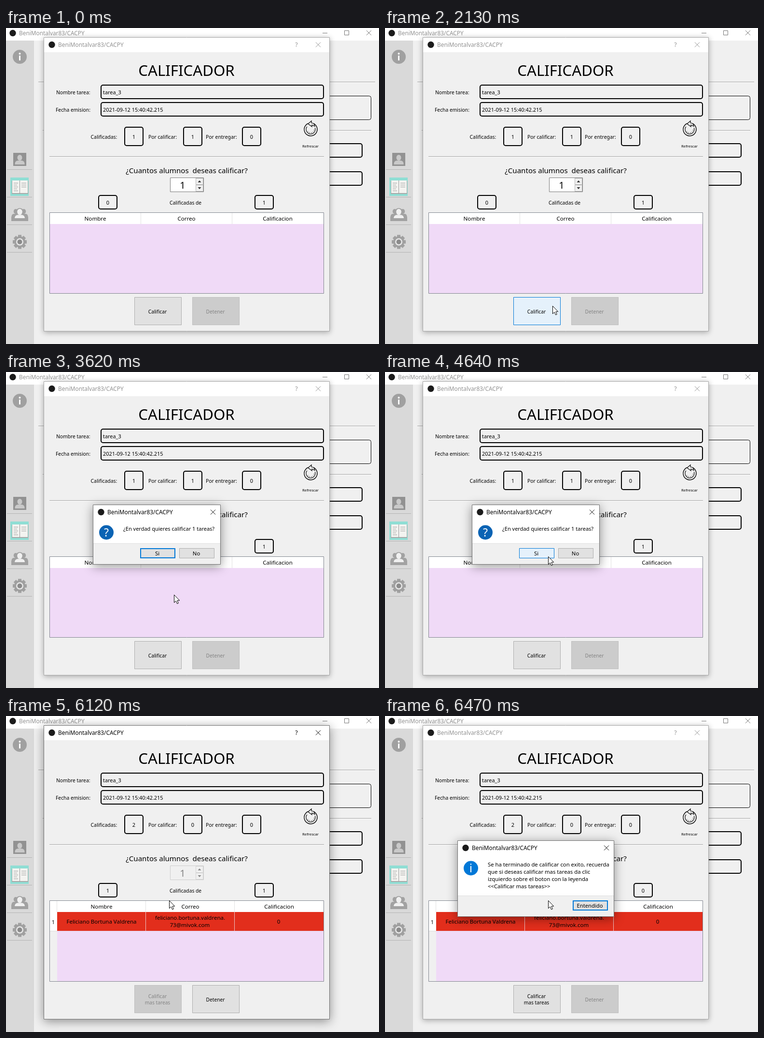
An HTML page with a canvas for the animation above (8000 ms loop, 773 px wide and 653 px high).

```html
<!DOCTYPE html>
<html lang="es">
<head>
<meta charset="utf-8">
<title>Calificador</title>
<style>
html, body { margin: 0; width: 100%; height: 100%; overflow: hidden; background: #f0f0f0; }
canvas { display: block; }
</style>
</head>
<body>
<canvas id="stage" width="773" height="653"></canvas>
<script>
const W = 773, H = 653, LOOP = 8000;
const stage = document.getElementById('stage').getContext('2d');
const layer = document.createElement('canvas');
layer.width = W;
layer.height = H;
const layerCtx = layer.getContext('2d');
let c = stage;

const APP = 'BeniMontalvar83/CACPY';
const FONT = '"Noto Sans", "Open Sans", sans-serif';
const GREY = '#838383';
const NORMAL = { fill: [225, 225, 225], edge: [173, 173, 173] };
const HOVER = { fill: [229, 241, 251], edge: [0, 120, 215] };
const PRESSED = { fill: [204, 228, 247], edge: [0, 84, 153] };
const OFF = { fill: [204, 204, 204], edge: [191, 191, 191] };

const clamp = v => Math.max(0, Math.min(1, v));
const lerp = (a, b, p) => a + (b - a) * p;
const ease = p => p * p * (3 - 2 * p);
const rgb = a => `rgb(${a.map(Math.round)})`;
const mix = (a, b, p) => ({
  fill: a.fill.map((v, i) => lerp(v, b.fill[i], p)),
  edge: a.edge.map((v, i) => lerp(v, b.edge[i], p))
});

// Progress 0..1 that advances in equal held steps
function stepped(t, start, end, n) {
  if (t < start) return 0;
  return clamp((Math.floor((t - start) / (end - start) * (n - 1) + 1e-6) + 1) / n);
}

function text(s, x, y, size = 10.3, color = '#000', align = 'left') {
  c.font = `${size}px ${FONT}`;
  c.fillStyle = color;
  c.textAlign = align;
  c.fillText(s, x, y);
}
const mid = (s, x, y, size, color) => text(s, x, y, size, color, 'center');

function rect(x, y, w, h, color) {
  c.fillStyle = color;
  c.fillRect(x, y, w, h);
}

function frame(x, y, w, h, color, lw = 1, r = 0) {
  c.strokeStyle = color;
  c.lineWidth = lw;
  c.beginPath();
  c.roundRect(x + lw / 2, y + lw / 2, w - lw, h - lw, r);
  c.stroke();
}

function path(points, color, lw = 1, close = false) {
  c.beginPath();
  points.forEach(([x, y]) => c.lineTo(x, y));
  if (close) c.closePath();
  c.strokeStyle = color;
  c.lineWidth = lw;
  c.stroke();
}

function poly(points, color) {
  c.beginPath();
  points.forEach(([x, y]) => c.lineTo(x, y));
  c.fillStyle = color;
  c.fill();
}

function disc(x, y, r, color) {
  c.beginPath();
  c.arc(x, y, r, 0, Math.PI * 2);
  c.fillStyle = color;
  c.fill();
}

function ring(x, y, r, color, lw, from = 0, to = Math.PI * 2) {
  c.beginPath();
  c.arc(x, y, r, from, to);
  c.strokeStyle = color;
  c.lineWidth = lw;
  c.stroke();
}

function cross(x, y, color) {
  path([[x - 5, y - 5], [x + 5, y + 5]], color);
  path([[x + 5, y - 5], [x - 5, y + 5]], color);
}

function groove(x, y, w) {
  rect(x, y, w, 1, '#a0a0a0');
  rect(x, y + 1, w, 1, '#fff');
}

function win(x, y, w, h, bar, active) {
  c.save();
  c.shadowColor = active ? 'rgba(0,0,0,.42)' : 'rgba(0,0,0,.32)';
  c.shadowBlur = active ? 20 : 11;
  c.shadowOffsetY = active ? 4 : 2;
  rect(x, y, w, h, '#f0f0f0');
  c.restore();
  rect(x, y, w, bar, '#fff');
  frame(x, y, w, h, active ? '#707070' : '#a6a6a6');
}

function titleBar(x, y, closeX, color) {
  disc(x, y, 6.7, '#1b1b1b');
  text(APP, x + 13, y + 4.5, 11.85, color);
  if (closeX) cross(closeX, y, color);
}

function button(x, y, w, h, look, lines, size, color, lw = 1) {
  rect(x, y, w, h, rgb(look.fill));
  frame(x, y, w, h, rgb(look.edge), lw);
  const first = y + h / 2 + 4.5 - (lines.length - 1) * 6.5;
  lines.forEach((s, i) => mid(s, x + w / 2 - 1, first + i * 13, size, color));
}

function counter(x, y, h, value) {
  frame(x, y, 40, h, '#000', 2, 4);
  mid(value, x + 20, y + h / 2 + 5, 11);
}

function person(x, y, s, color) {
  c.beginPath();
  c.ellipse(x, y, 5 * s, 6 * s, 0, 0, Math.PI * 2);
  c.fillStyle = color;
  c.fill();
  c.beginPath();
  c.roundRect(x - 10 * s, y + 6 * s, 20 * s, 8 * s, [6 * s, 6 * s, 0, 0]);
  c.fill();
}

function sidebar() {
  rect(0, 26, 58, H - 26, '#d9d9d9');
  disc(28.5, 59.5, 14.5, '#a0a0a0');
  disc(28.5, 53, 2, '#fff');
  rect(27, 57, 3, 10, '#fff');

  rect(15, 258, 27, 27, '#929292');
  person(28.5, 268, 1, '#c9c9c9');
  rect(23, 275, 11, 4, '#c9c9c9');

  rect(9, 309, 38, 38, '#8fded4');
  rect(12, 316, 34, 27, '#a9a9a9');
  rect(13, 315, 32, 26, '#f3f3f0');
  rect(28, 315, 1, 27, '#999');
  for (let i = 0; i < 5; i++) {
    rect(16, 320 + i * 4, i % 2 ? 7 : 9, 1, '#a0a0a0');
    if (i < 3) rect(32, 320 + i * 4, 10, 1, '#a0a0a0');
  }

  person(20, 379, .85, '#a2a2a2');
  person(37, 379, .85, '#a2a2a2');
  rect(11, 390, 35, 9, '#a2a2a2');
  disc(28.5, 381, 9, '#a2a2a2');
  person(28.5, 380, 1.05, '#f0f0f0');
  rect(18, 393, 21, 3, '#a2a2a2');

  c.save();
  c.translate(28.5, 442);
  for (let i = 0; i < 8; i++) {
    c.rotate(Math.PI / 4);
    rect(-3.5, -14.5, 7, 8, '#a0a0a0');
  }
  c.restore();
  disc(28.5, 442, 11.5, '#a0a0a0');
  disc(28.5, 442, 7.5, '#e8e8e8');
  disc(28.5, 442, 5, '#8b8b8b');

  [292, 349, 406, 463].forEach(y => rect(2, y, 52, 1, '#b4b4b4'));
}

function backWindow() {
  rect(0, 0, W, H, '#f0f0f0');
  rect(0, 0, W, 26, '#fff');
  titleBar(14, 10.5, 0, '#929292');
  rect(656, 10, 10, 1, '#777');
  frame(701, 5, 10, 10, '#777');
  cross(752, 10, '#777');
  sidebar();
  groove(67, 111, 698);
  groove(76, 211, 681);
  frame(100, 140, 657, 50, '#000', 1, 4);
  frame(100, 238, 639, 30, '#000', 2, 4);
  frame(100, 296, 639, 30, '#000', 2, 4);
}

function refreshIcon() {
  ring(631.5, 209.5, 13.5, '#111', 1.5, -1.1, Math.PI * 1.36);
  ring(631.5, 209.5, 9.5, '#111', 1.2, -.35, Math.PI * 1.2);
  c.setLineDash([1.5, 2.5]);
  ring(631.5, 209.5, 7, '#111', 1, .1, 2.6);
  c.setLineDash([]);
  const arrow = [[633, 192], [626, 198], [634, 204], [634, 200.5], [640, 203], [638, 197.5], [633, 196]];
  poly(arrow, '#f0f0f0');
  path(arrow, '#111', 1.3, true);
  mid('Refrescar', 631, 247, 7.7);
}

function spinBox(value, on) {
  rect(340, 309, 70, 30, on ? '#fff' : '#f0f0f0');
  frame(340, 309, 70, 30, on ? '#7a7a7a' : '#ccc');
  [[310, 1], [324, -1]].forEach(([y, up]) => {
    rect(393, y, 16, 14, '#f0f0f0');
    frame(393, y, 16, 14, on ? '#b4b4b4' : '#d2d2d2');
    const m = y + 7;
    poly([[397.5, m + 2 * up], [404.5, m + 2 * up], [401, m - 2 * up]], on ? '#333' : '#888');
  });
  mid(value, 366, 332, 20, on ? '#000' : GREY);
}

function table(hasRow) {
  rect(90, 381, 569, 168, '#f0daf7');
  rect(91, 382, 567, 23, '#fff');
  const cuts = hasRow ? [289, 473] : [279, 468];
  const centers = hasRow ? [198, 382, 566] : [185, 374, 563];
  cuts.forEach(x => rect(x, 382, 1, 23, '#e2e2e2'));
  ['Nombre', 'Correo', 'Calificacion'].forEach((s, i) => mid(s, centers[i], 398, 11.6));
  if (hasRow) {
    rect(91, 405, 15, 143, '#f0f0f0');
    rect(91, 405, 15, 39, '#fff');
    rect(105, 382, 1, 23, '#e2e2e2');
    rect(91, 444, 15, 1, '#dcdcdc');
    rect(106, 405, 552, 39, '#e22e1c');
    rect(106, 444, 552, 1, '#e4d3ea');
    cuts.forEach(x => rect(x, 405, 1, 39, '#ecc4c6'));
    mid('1', 98, 430, 11);
    mid('Feliciano Bortuna Valdrena', 198, 429, 11.5);
    mid('feliciano.bortuna.valdrena.', 381.5, 421, 11.5);
    mid('73@mivok.com', 381, 436, 11.5);
    mid('0', 565, 429, 11.5);
  }
  frame(90, 381, 569, 168, '#828790');
}

function gradeLook(t) {
  if (t < 2460) return mix(NORMAL, HOVER, stepped(t, 1700, 1860, 3));
  return mix(PRESSED, NORMAL, stepped(t, 2590, 2730, 3));
}

function mainDialog(t) {
  const active = (t >= 2460 && t < 2660) || (t >= 5170 && t < 6260);
  const running = t >= 5170 && t < 6190;
  const graded = t >= 6120, done = t >= 6190;
  const tint = active ? '#000' : '#929292';

  win(78, 19, 593, 608, 31, active);
  titleBar(95, 34.5, 647, tint);
  mid('?', 602, 39, 12.5, tint);

  mid('CALIFICADOR', 374, 99, 31.2);
  text('Nombre tarea:', 104, 137);
  text('Fecha emision:', 103, 173);
  frame(196, 117, 463, 30, '#000', 2, 4);
  frame(196, 153, 463, 30, '#000', 2, 4);
  text('tarea_3', 201, 137, 10.9);
  text('2021-09-12 15:40:42.215', 201, 173, 10.9);

  text('Calificadas:', 175.5, 229, 10.4);
  text('Por calificar:', 295, 229, 10.3);
  text('Por entregar:', 414, 229, 10.4);
  counter(245, 204, 40, graded ? '2' : '1');
  counter(367, 204, 40, graded ? '0' : '1');
  counter(489, 204, 40, '0');
  refreshIcon();
  groove(90, 265, 569);

  mid('¿Cuantos alumnos  deseas calificar?', 374.5, 300, 15.1);
  spinBox(done ? '0' : '1', !running);
  counter(191, 345, 30, graded && !done ? '1' : '0');
  text('Calificadas de', 339, 365, 10.25);
  counter(515, 345, 30, done ? '0' : '1');
  table(graded);

  const label = t >= 5170 ? ['Calificar', 'mas tareas'] : ['Calificar'];
  button(266, 556, 98, 58, running ? OFF : gradeLook(t), label, 10.2, running ? GREY : '#000');
  button(386, 556, 98, 58, running ? NORMAL : OFF, ['Detener'], 10.2, running ? '#000' : GREY);
}

function messageBox(x, y, w, h, footer, icon, color) {
  win(x, y, w, h, footer, true);
  rect(x + 1, y + footer, w - 2, 1, '#dfdfdf');
  titleBar(x + 17, y + 15.5, x + w - 16, '#000');
  disc(x + 28, y + 57.5, 15, color);
  mid(icon, x + 28, y + 66, 23, '#fff');
}

function askBox(t) {
  messageBox(180, 274, 265, 124, 80, '?', '#0a63b4');
  text('¿En verdad quieres calificar 1 tareas?', 243, 328, 11);
  const over = stepped(t, 4170, 4380, 4);
  const press = stepped(t, 4700, 4770, 2) - stepped(t, 4900, 4970, 2);
  const idle = { fill: NORMAL.fill, edge: HOVER.edge };
  const look = mix(mix(idle, HOVER, over), PRESSED, press);
  button(278, 364, 73, 21, look, ['Si'], 11.3, '#000', over > .5 ? 1 : 2);
  button(359, 364, 73, 21, NORMAL, ['No'], 11.3, '#000');
}

function doneBox() {
  messageBox(150, 257, 325, 158, 114, 'i', '#0078d7');
  ['Se ha terminado de calificar con exito, recuerda',
    'que si deseas calificar mas tareas da clic',
    'izquierdo sobre el boton con la leyenda',
    '<<Calificar mas tareas>>'
  ].forEach((s, i) => text(s, 213, 311 + i * 15, 11.3));
  button(389, 381, 73, 21, { fill: NORMAL.fill, edge: HOVER.edge }, ['Entendido'], 11.2, '#000', 2);
}

// Paints a box on its own layer, then blends it with scale about its centre
function fade(paint, cx, cy, alpha, scale) {
  if (alpha <= 0) return;
  layerCtx.clearRect(0, 0, W, H);
  c = layerCtx;
  paint();
  c = stage;
  c.save();
  c.globalAlpha = alpha;
  c.translate(cx, cy);
  c.scale(scale, scale);
  c.drawImage(layer, -cx, -cy);
  c.restore();
}

function popup(t) {
  if (t >= 2660 && t < 5230) {
    const open = stepped(t, 2660, 2870, 4);
    const shut = t < 5120 ? 0 : t < 5170 ? .45 : .85;
    const alpha = (1 - Math.pow(1 - open, 2.75)) * (1 - shut);
    fade(() => askBox(t), 312.5, 336, alpha, 1 - .03 * (1 - open) ** 2 - .06 * shut);
  } else if (t >= 6260) {
    const open = stepped(t, 6260, 6470, 4);
    fade(doneBox, 312.5, 336, 1 - Math.pow(1 - open, 2.75), 1 - .03 * (1 - open) ** 2);
  }
}

function cursorAt(t) {
  if (t < 2130) {
    const p = ease(stepped(t, 1320, 1860, 8));
    return [lerp(462, 347, p), lerp(590, 573, p)];
  }
  if (t < 4030) {
    const p = ease(stepped(t, 3210, 3960, 12));
    return [lerp(347, 341, p) + 5 * Math.sin(Math.PI * p), lerp(574, 391, p)];
  }
  const p = ease(stepped(t, 4030, 4380, 6));
  return [lerp(341, 338, p), lerp(391, 381, p)];
}

function cursor(t) {
  if (t < 790) return;
  const [x, y] = cursorAt(t).map(Math.round);
  const shape = [[0, 0], [0, 16], [3.7, 12.7], [6.2, 18.3], [8.8, 17.2], [6.4, 11.6], [11.2, 11.6]]
    .map(([dx, dy]) => [x + dx + .5, y + dy + .5]);
  poly(shape, '#fff');
  path(shape, '#000', 1, true);
}

function draw(now) {
  const t = now % LOOP;
  backWindow();
  mainDialog(t);
  popup(t);
  cursor(t);
}

let begin;
function tick(now) {
  begin ??= now;
  draw(Math.max(0, now - begin));
  requestAnimationFrame(tick);
}
draw(0);
requestAnimationFrame(tick);
</script>
</body>
</html>
```
